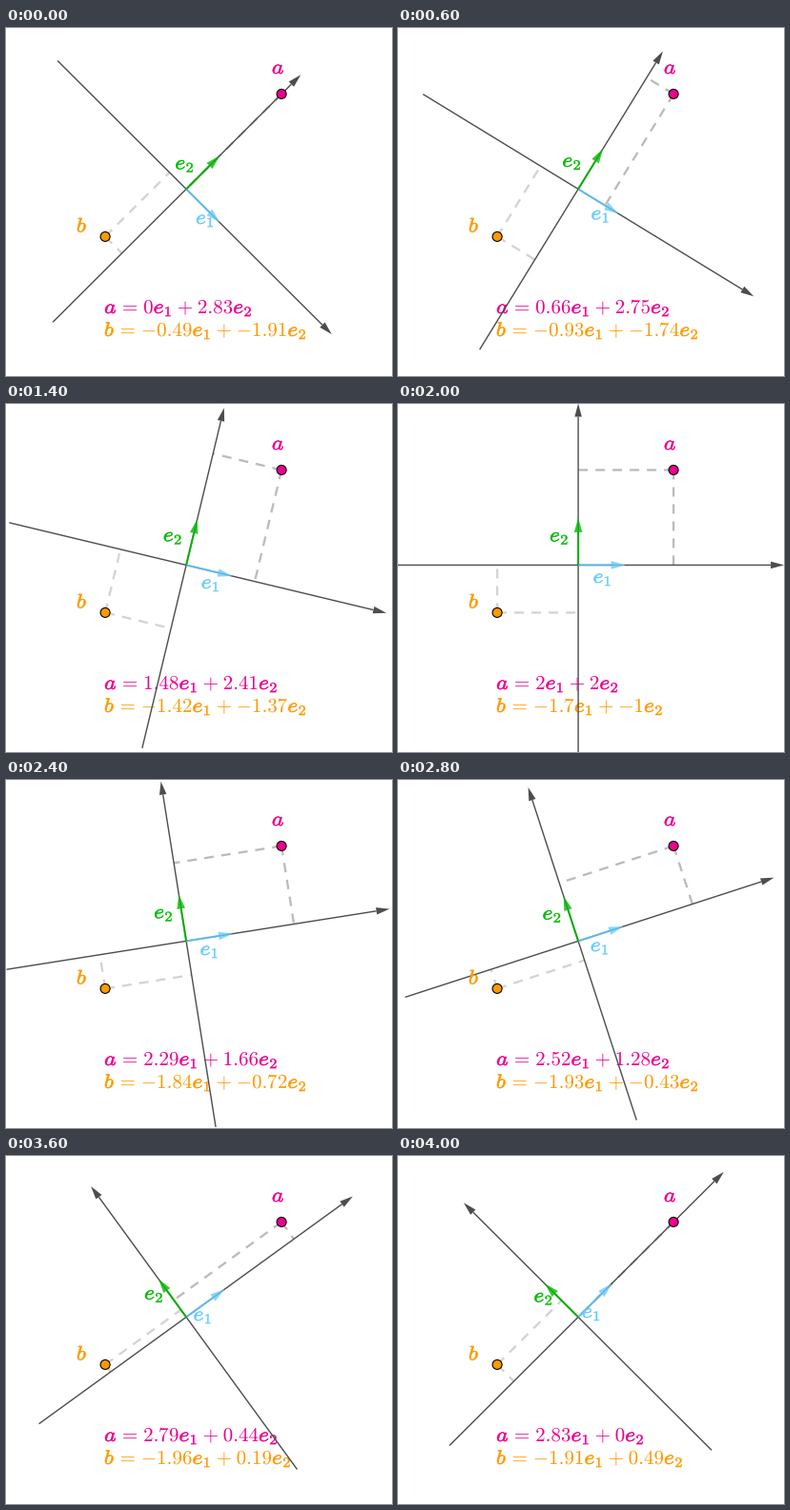
These frames come from a looping animation (405x366 px, 4200 ms). A matplotlib script:

```python
import numpy as np
import matplotlib.pyplot as plt
from matplotlib.animation import FuncAnimation
from matplotlib.patches import Circle, PathPatch, Polygon
from matplotlib.textpath import TextPath
from matplotlib.transforms import Affine2D

plt.rcParams["mathtext.fontset"] = "cm"

WIDTH, HEIGHT, DPI = 405, 366, 64
FRAMES, INTERVAL = 21, 200
PX = 72 / DPI  # one pixel in points

ORIGIN = np.array([189.1, 169.4])
UNIT = 50
A, B = np.array([2, 2]), np.array([-1.7, -1])
PINK, ORANGE, BLUE, GREEN = "#ec0090", "#ff9900", "#66ccff", "#00bb00"
AXIS, DASH_A, DASH_B = "#4d4d4d", "#bbbbbb", "#d3d3d3"

# Glyph advances in em; operators include their surrounding space.
EM = 21
ADVANCE = {"a": .633, "b": .521, "e": .527, ".": .278,
           "-": .778, "=": 1.334, "+": 1.222}
GLYPHS = {}

fig = plt.figure(figsize=(WIDTH / DPI, HEIGHT / DPI), dpi=DPI, facecolor="white")
ax = fig.add_axes([0, 0, 1, 1])


def glyph(char):
    if char not in GLYPHS:
        GLYPHS[char] = TextPath((0, 0), f"${char}$", size=1)
    return GLYPHS[char]


def put_glyph(x, y, char, color, em, bold, zorder):
    """Draw one glyph centred in its advance and return that advance."""
    advance = ADVANCE.get(char, .575 if bold else .5) * em
    path = glyph(char)
    box = path.get_extents()
    wide = 1.12 if bold else 1
    left = x + (advance - box.width * wide * em) / 2
    place = (Affine2D().translate(-box.x0, 0)
             .scale(em * wide, -em).translate(left, y))
    weight = .03 * em * PX if bold else 0
    ax.add_patch(PathPatch(place.transform_path(path), facecolor=color,
                           edgecolor=color if bold else "none",
                           linewidth=weight, zorder=zorder, snap=False))
    return advance


def write(x, y, text, color, zorder=2):
    """Set a formula: letters are bold italic, '_' marks a subscript digit."""
    chars = iter(text)
    for char in chars:
        if char == "_":
            x += put_glyph(x, y + .15 * EM, next(chars), color,
                           .7 * EM, True, zorder) + .05 * EM
        else:
            x += put_glyph(x, y, char, color, EM, char.isalpha(), zorder)


def line(start, end, color, width, **style):
    ax.plot(*zip(start, end), color=color, lw=width * PX, snap=False,
            solid_capstyle="butt", dash_capstyle="butt", **style)


def arrow(tail, tip, color, width, head, alpha=1, zorder=3):
    length, breadth = head
    along = (tip - tail) / np.hypot(*(tip - tail))
    side = np.array([-along[1], along[0]]) * breadth / 2
    neck = tip - along * length
    line(tail, neck, color, width, alpha=alpha, zorder=zorder)
    ax.add_patch(Polygon([tip, neck + side, neck - side], facecolor=color,
                         edgecolor="none", alpha=alpha, zorder=zorder,
                         snap=False))


def number(value):
    return f"{round(value, 2) + 0.0:g}"


def to_pixels(point):
    return ORIGIN + UNIT * point * [1, -1]


def draw(frame):
    ax.clear()
    ax.set(xlim=(0, WIDTH), ylim=(HEIGHT, 0))
    ax.axis("off")

    angle = np.radians(-45 + 4.5 * frame)
    c, s = np.cos(angle), np.sin(angle)
    basis = np.array([[c, s], [-s, c]])
    e1, e2 = basis * [1, -1]

    for name, point, color, dash, baseline in (
            ("a", A, PINK, DASH_A, 300), ("b", B, ORANGE, DASH_B, 324)):
        u, v = basis @ point
        spot = to_pixels(point)
        for foot in (u * e1, v * e2):
            line(spot, ORIGIN + UNIT * foot, dash, 2.3, zorder=1,
                 ls=(0, (10 / 2.3, 8 / 2.3)))
        write(102.8, baseline, f"{name}={number(u)}e_1+{number(v)}e_2", color)
        ax.add_patch(Circle(spot, 5, facecolor=color, edgecolor="black",
                            linewidth=1.1 * PX, zorder=6))

    arrow(ORIGIN - 191 * e1, ORIGIN + 216 * e1, AXIS, 1.4, (14, 7.5))
    arrow(ORIGIN - 198 * e2, ORIGIN + 170 * e2, AXIS, 1.4, (14, 7.5))
    arrow(ORIGIN, ORIGIN + 49.5 * e1, BLUE, 2.2, (15, 8.7), .8, 4)
    arrow(ORIGIN, ORIGIN + 49.5 * e2, GREEN, 2.2, (15, 8.7), .8, 4)

    # Labels follow the middle of each basis vector.
    x, y = ORIGIN + [29 * c - 4.2 * s - 4, 15 - 25.5 * s]
    write(x - 9.6, y + 3.6, "e_1", BLUE, zorder=5)
    x, y = ORIGIN + [-3 * c - 24.7 * s - 17, 3.5 * s - 22 * c - 6.5]
    write(x - 10.1, y + 3.6, "e_2", GREEN, zorder=5)
    write(278.6, 48, "a", PINK, zorder=5)
    write(73.8, 214.5, "b", ORANGE, zorder=5)
    return []


animation = FuncAnimation(fig, draw, frames=FRAMES, interval=INTERVAL,
                          repeat=True, repeat_delay=0)
plt.show()
```
